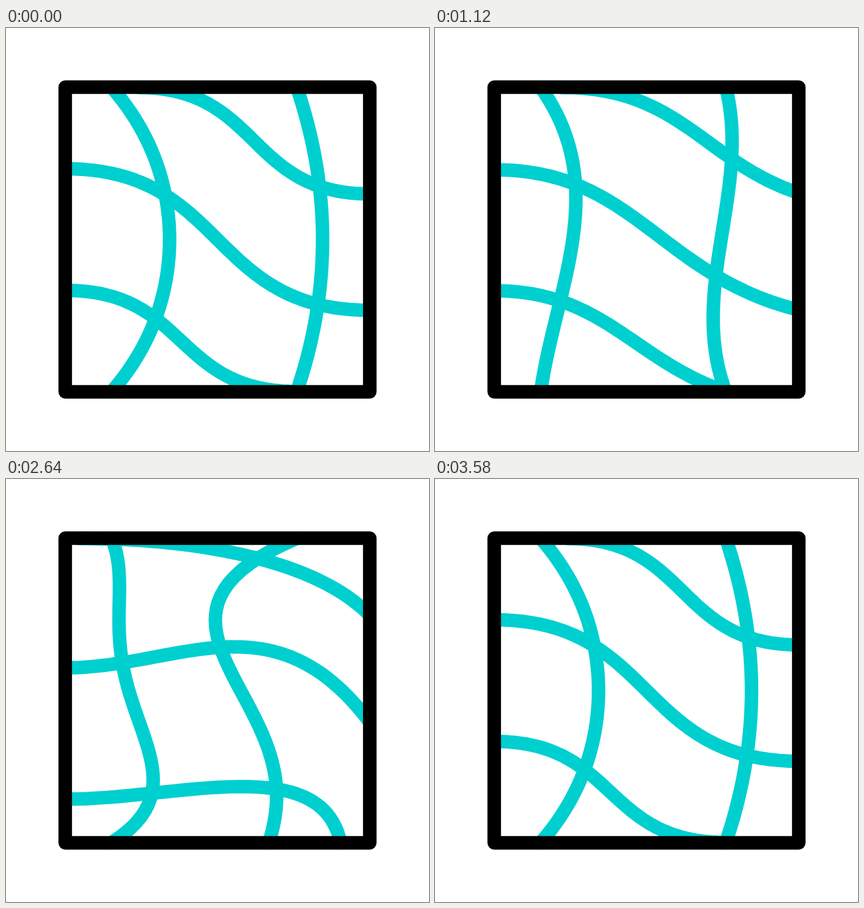
Write an HTML page that moves like this. It is 640x640 px and loops after 3.6 s.

```html
<!DOCTYPE html>
<html lang="en">
<head>
<meta charset="utf-8">
<title>Warping grid</title>
<style>
  html, body { margin: 0; width: 100%; height: 100%; overflow: hidden; background: #fff; }
  svg { display: block; width: 100vw; height: 100vh; }
</style>
</head>
<body>
<svg viewBox="0 0 640 640" fill="none" stroke-width="20.48" stroke-linecap="round" stroke-linejoin="round">
  <g id="grid" stroke="#00cfd0"></g>
  <rect x="89.6" y="89.6" width="460.8" height="460.8" stroke="#000"/>
</svg>
<script>
const LOOP = 3600;
const KEY_TIMES = [0, 1060, 2440, LOOP];
const STEPS = 48;
const TOP = 90, BOTTOM = 550, RIGHT = 550;

const lerp = (a, b, t) => a + (b - a) * t;
const mixPoints = (p, q, t) => [lerp(p[0], q[0], t), lerp(p[1], q[1], t)];
const ease = s => s * s * (3 - 2 * s);

// Crosswise line: leaves level and arrives tilted. Reaches are shares of its width.
const swing = ([x0, y0], [x1, y1], reachOut, reachIn, tilt = 0) => [
  [x0, y0],
  [lerp(x0, x1, reachOut), y0],
  [lerp(x1, x0, reachIn), y1 - tilt],
  [x1, y1]
];

// Upright line: control points evenly spaced downwards, pushed sideways.
const bow = (x, ...pushes) => [0, ...pushes].map((push, i) =>
  [x + push, lerp(TOP, BOTTOM, i / pushes.length)]);

// Three key poses for each line.
const LINES = [
  [swing([200, TOP], [RIGHT, 251], .53, .53),
   swing([193, TOP], [RIGHT, 250], .5, .4, 47),
   swing([104, TOP], [RIGHT, 202], .4, .16, 90)],

  [swing([90, 213], [RIGHT, 427], .53, .53),
   swing([90, 214], [RIGHT, 427], .46, .46, 52),
   swing([90, 292], [RIGHT, 362], .36, .3, 209)],

  [swing([90, 397], [440, BOTTOM], .53, .53),
   swing([90, 397], [440, BOTTOM], .47, .4, 46),
   swing([90, 492], [512, BOTTOM], .4, .04, 150)],

  [bow(160, 100, 100, 100, 0),
   bow(160, 82, 65, 15, 0),
   bow(160, 44, -101, 189, 0)],

  [bow(440, 39, 52, 39, 0),
   bow(440, 31, -9, -44, 0),
   bow(440, -300, -42, -9, -46)]
];

// De Casteljau, for any number of control points.
function pointOn(points, t) {
  while (points.length > 1) {
    points = points.slice(1).map((p, i) => mixPoints(points[i], p, t));
  }
  return points[0];
}

const outline = points => "M" + Array.from({ length: STEPS + 1 },
  (_, i) => pointOn(points, i / STEPS).map(v => v.toFixed(2))).join("L");

const grid = document.getElementById("grid");
const paths = LINES.map(() =>
  grid.appendChild(document.createElementNS("http://www.w3.org/2000/svg", "path")));

function draw(now) {
  const time = now % LOOP;
  const key = KEY_TIMES.findLastIndex(k => k <= time);
  const mix = ease((time - KEY_TIMES[key]) / (KEY_TIMES[key + 1] - KEY_TIMES[key]));

  LINES.forEach((poses, i) => {
    const next = poses[(key + 1) % poses.length];
    const points = poses[key].map((p, j) => mixPoints(p, next[j], mix));
    paths[i].setAttribute("d", outline(points));
  });
  requestAnimationFrame(draw);
}
requestAnimationFrame(draw);
</script>
</body>
</html>
```
